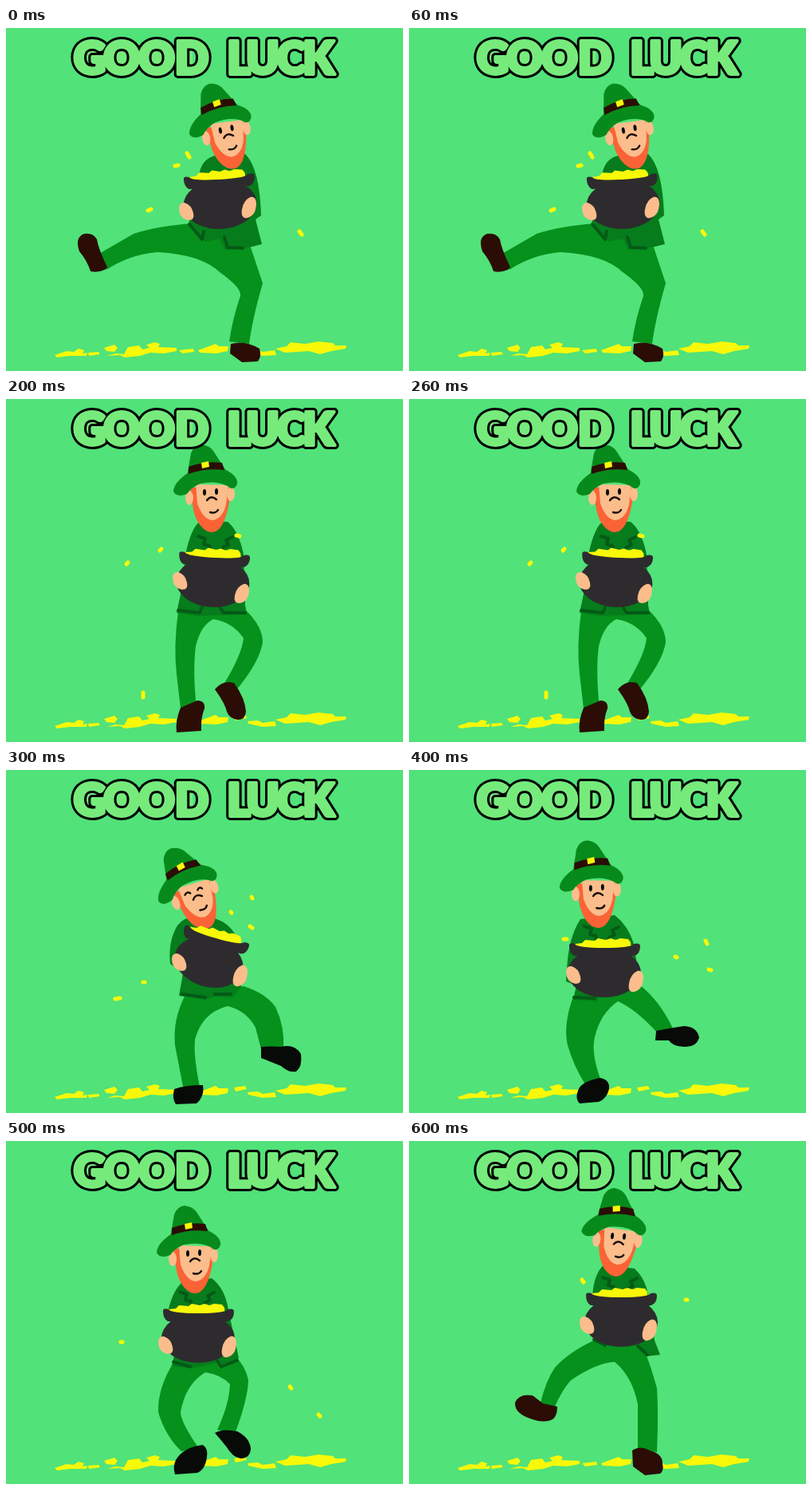
Write an HTML page without scripts that moves like this. It is 498 px wide and 430 px high and loops after 700 ms.

```html
<!DOCTYPE html>
<html lang="en">
<head>
<meta charset="utf-8">
<title>Good Luck</title>
<style>
html, body { margin: 0; width: 100%; height: 100%; overflow: hidden; background: #51e279; }
svg { display: block; width: 100vw; height: 100vh; }

.pose { visibility: hidden; animation: show 700ms step-end infinite; animation-delay: calc(var(--i) * 100ms - 700ms); }
@keyframes show {
  0% { visibility: visible; }
  14.2857%, 100% { visibility: hidden; }
}

.pants { fill: #05911c; }
.coat { fill: #067c1c; }
.hat { fill: #078a1c; }
.brown { fill: #2b0d06; }
.black { fill: #080a08; }
.iron { fill: #2e2b2e; }
.skin { fill: #fbbd8c; }
.beard { fill: #fb6336; }
.gold { fill: #f8f808; }
.trim, .line, .coins { fill: none; stroke-linecap: round; stroke-linejoin: round; }
.trim { stroke: #045a16; stroke-width: 4; }
.line { stroke: #1a0c08; stroke-width: 2.4; }
.coins { stroke: #f8f808; stroke-width: 5; }

.title { font: 900 56px Lato, Inter, sans-serif; text-anchor: middle; stroke-linejoin: round; fill: #76eb7c; }
.edge { fill: #000; stroke: #000; stroke-width: 10; }
.face { stroke: #76eb7c; stroke-width: 4; }
</style>
</head>
<body>
<svg viewBox="0 0 498 430" preserveAspectRatio="none">
<defs>
  <!-- origin at the nose -->
  <g id="head">
    <path class="beard" d="M-27-14L-23 14Q-18 35-5 41Q4 44 10 37Q18 28 22 4L24-14Z"/>
    <ellipse class="skin" cx="-28" cy="-1" rx="5" ry="9"/>
    <ellipse class="skin" cx="24" cy="-6" rx="5" ry="9"/>
    <path class="skin" d="M-20-18L-18 6Q-11 26 1 27Q14 25 18 7L21-17Z"/>
    <path class="hat" d="M-31-28L-26-57Q-22-67-13-68Q-3-67 2-60L20-32Z"/>
    <path class="hat" d="M-48-9Q-48-20-29-33Q-6-40 16-37Q33-29 32-19Q30-12 24-13Q10-24-14-19Q-26-14-31-6Q-44-1-48-9Z"/>
    <path class="brown" d="M-29-40Q-8-48 13-45L16-36Q-8-39-29-31Z"/>
    <path class="gold" d="M-13-45L-4-47L-3-40L-12-38Z"/>
    <path class="line" d="M-6 2Q-1-5 6 1M-2 17Q5 19 8 14"/>
  </g>
  <g id="eyes">
    <ellipse class="black" cx="-9" cy="-8" rx="2" ry="4"/>
    <ellipse class="black" cx="6" cy="-9" rx="2" ry="4"/>
  </g>
  <path id="shut" class="line" d="M-14-7Q-10-11-7-7M3-8Q6-12 9-8"/>
  <!-- origin at the middle of the rim -->
  <g id="pot">
    <path class="gold" d="M-36 4L-37-6L-28-7L-24-11L-12-10L-8-13L2-11L8-13L14-11L20-13L30-12L33-8L34 4Z"/>
    <ellipse class="iron" cy="30" rx="46" ry="31"/>
    <path class="iron" d="M-44-4Q-44-8-37-6Q-34-1 0-1T37-6Q45-8 45-3Q45 6 38 9H-38Q-44 6-44-4Z"/>
  </g>
  <path id="lapel" class="trim" d="M-24-25l9 3-2 7 7 2 2 8M19-24l-8 4 3 6-7 3-1 7"/>
  <path id="hand" class="skin" d="M-9-5Q-8-12-2-11Q7-8 9 2Q11 11 3 11Q-9 9-9-5Z"/>
</defs>

<g class="gold">
  <path d="M61 410L76 405L85 406L91 402L98 404L96 408L102 407L101 411L80 411L64 413Z"/>
  <path d="M103 407L116 406L118 409L104 411Z"/>
  <path d="M123 401L136 397L140 401L136 406L126 405Z"/>
  <path d="M127 411L137 408L148 409L153 400L167 398L171 403L180 401L176 397L187 394L193 396L191 400L214 401L214 405L198 408L181 407L168 411L149 413L143 410Z"/>
  <path d="M217 404L235 402L236 406L221 408Z"/>
  <path d="M241 404L252 400L263 396L267 399L279 399L278 405L264 408L243 407Z"/>
  <path d="M286 398L300 396L302 400L288 403Z"/>
  <path d="M303 404L316 403L322 406L337 404L339 410L322 411L304 407Z"/>
  <path d="M338 402L352 399L357 394L375 396L392 393L410 395L413 398L427 398L426 402L408 405L394 409L380 405L366 406L350 407Z"/>
</g>

<g class="pose" style="--i:0">
  <path class="pants" d="M235 245Q190 248 160 258L115 284L126 303Q155 284 190 281Q245 284 268 306Q296 326 294 336Q284 365 280 393L305 396Q309 365 322 320Q314 296 306 272L270 255Z"/>
  <path class="coat" d="M243 180Q247 164 262 160L300 158Q318 175 320 235L313 240L321 271Q300 277 275 278L268 264L250 268L229 246Z"/>
  <path class="trim" d="M230 246L246 265L248 255M274 262L278 275L297 276"/>
  <path class="brown" d="M124 303Q115 307 106 305Q102 292 92 280Q86 262 98 258Q109 256 114 265Q116 277 127 300ZM282 396Q300 391 318 402Q321 411 316 418L296 419L281 408Z"/>
  <use href="#head" transform="translate(279 135) rotate(-9)"/>
  <use href="#eyes" transform="translate(279 135) rotate(-9)"/>
  <use href="#pot" transform="translate(267 191) rotate(-3)"/>
  <use href="#hand" x="226" y="230"/>
  <use href="#hand" transform="translate(305 225) scale(-1 1.2)"/>
  <path class="coins" d="M227 157l3 5M212 173l4-1M178 229l4-2M368 255l3 4"/>
</g>

<g class="pose" style="--i:1">
  <path class="pants" d="M226 246Q190 262 163 282Q155 288 159 296Q170 320 170 350L189 350Q188 320 183 300Q215 278 245 277Q280 288 296 318Q284 350 278 392L299 394Q304 360 320 320Q316 300 289 266Z"/>
  <path class="coat" d="M230 172Q232 152 248 147L284 150Q304 165 310 222L304 230L305 268Q285 273 270 270L228 252L224 260Q210 252 199 235L212 226Z"/>
  <path class="trim" d="M201 237L224 258L228 247M268 258L274 269L286 269"/>
  <path class="black" d="M141 346Q144 337 160 337L172 347L190 349Q192 362 189 371Q180 375 170 366Q145 356 141 346ZM280 396Q300 391 318 402Q320 410 316 416L298 419L281 406Z"/>
  <use href="#lapel" x="266" y="186"/>
  <use href="#head" transform="translate(265 126)"/>
  <use href="#eyes" transform="translate(265 126)"/>
  <use href="#pot" transform="translate(260 188) rotate(5)"/>
  <use href="#hand" x="217" y="217"/>
  <use href="#hand" transform="translate(294 234) scale(-1 1.2)"/>
  <path class="coins" d="M167 156l4 1M196 174l4-1M126 272l3 3M368 329l2 5M290 171l3-1"/>
</g>

<g class="pose" style="--i:2">
  <path class="pants" d="M216 266Q210 310 214 345L219 388L239 388Q234 340 238 310Q244 284 260 276Q285 280 298 300Q296 320 273 358L288 366Q318 330 322 305Q322 285 300 264Z"/>
  <path class="coat" d="M225 196Q232 160 245 152L278 154Q292 165 298 195L300 258L302 270L240 272L214 268L220 240Z"/>
  <path class="trim" d="M216 265L243 268L246 261M269 262L273 268L300 268"/>
  <path class="brown" d="M219 387L240 378Q250 378 249 388Q244 400 245 416L214 418Q212 404 219 387ZM262 364Q272 352 286 356Q300 375 301 392Q300 403 290 402Q280 400 277 392Q275 382 262 364Z"/>
  <use href="#lapel" x="265" y="197"/>
  <use href="#head" transform="translate(258 125)"/>
  <use href="#eyes" transform="translate(258 125)"/>
  <use href="#pot" transform="translate(261 200) rotate(3)"/>
  <use href="#hand" x="218" y="228"/>
  <use href="#hand" transform="translate(296 244) scale(-1 1.1)"/>
  <path class="coins" d="M151 207l2-2M193 190l2-2M172 368v6M289 171l4 1"/>
</g>

<g class="pose" style="--i:3">
  <path class="pants" d="M225 282Q209 312 212 345L222 397L243 397Q235 358 237 338Q246 304 278 296Q302 302 313 323L320 350L348 350Q350 322 338 297Q326 280 298 271Z"/>
  <path class="coat" d="M206 243Q203 215 215 195Q225 182 240 185L262 186Q280 192 288 207L295 272L284 285L262 284L250 288L217 283L222 255Z"/>
  <path class="trim" d="M221 281L250 285M262 281L282 281"/>
  <path class="black" d="M211 400Q225 395 247 395Q249 405 243 414L239 418L213 419Q208 412 211 400ZM320 347Q332 346 345 347Q362 343 370 356Q372 372 364 378Q355 380 345 371L320 361Z"/>
  <use href="#head" transform="translate(240 159) rotate(-18)"/>
  <use href="#shut" transform="translate(240 159) rotate(-18)"/>
  <use href="#pot" transform="translate(263 212) rotate(16) scale(.95 1)"/>
  <use href="#hand" x="217" y="241"/>
  <use href="#hand" transform="translate(294 258) scale(-1 1.2)"/>
  <path class="coins" d="M308 159l1 2M282 178l1 1M306 196l3 2M172 266l2 0M137 287l6-1"/>
</g>

<g class="pose" style="--i:4">
  <path class="pants" d="M206 284Q193 320 199 345Q206 370 221 394L241 390Q228 355 233 335Q240 305 262 290Q285 300 312 330L331 324Q315 290 290 270Z"/>
  <path class="coat" d="M198 250Q200 210 215 187L258 182Q275 195 282 218L290 270L238 283L236 290L206 288L210 270L197 265Z"/>
  <path class="trim" d="M207 285L233 286"/>
  <path class="black" d="M212 402Q216 390 240 386Q252 388 251 400Q248 412 238 416L214 418Q208 412 212 402ZM310 327Q325 324 345 321Q362 322 364 336Q360 348 345 347Q330 346 326 339L309 339Z"/>
  <use href="#lapel" x="244" y="221"/>
  <use href="#head" transform="translate(237 156) rotate(-1)"/>
  <use href="#eyes" transform="translate(237 156) rotate(-1)"/>
  <use href="#pot" transform="translate(245 224)"/>
  <use href="#hand" x="206" y="257"/>
  <use href="#hand" transform="translate(285 265) scale(-1 1.2)"/>
  <path class="coins" d="M194 212l4 0M334 234l2 1M372 214l2 4M376 250l3 1"/>
</g>

<g class="pose" style="--i:5">
  <path class="pants" d="M210 278Q190 310 191 340Q200 370 220 389L241 384Q219 352 219 340Q225 305 250 290Q270 293 281 305Q280 330 265 362L287 367Q303 325 304 300Q300 280 285 268Z"/>
  <path class="coat" d="M203 215Q208 190 220 178L258 172Q275 185 279 212L292 272Q280 285 265 278L232 285L208 282L213 260Z"/>
  <path class="trim" d="M210 277L231 283M264 274L270 283L290 275"/>
  <path class="black" d="M213 400Q222 384 247 381Q254 386 252 396Q250 412 240 416L212 418Q209 408 213 400ZM262 366Q272 360 290 364Q306 372 307 386Q306 398 294 398Q284 396 277 384Q270 375 262 366Z"/>
  <use href="#lapel" x="242" y="214"/>
  <use href="#head" transform="translate(237 149)"/>
  <use href="#eyes" transform="translate(237 149)"/>
  <use href="#pot" transform="translate(241 217)"/>
  <use href="#hand" x="200" y="256"/>
  <use href="#hand" transform="translate(280 258) scale(-1 1.2)"/>
  <path class="coins" d="M144 252l2 0M356 308l2 2M392 343l2 2"/>
</g>

<g class="pose" style="--i:6">
  <path class="pants" d="M232 250Q200 265 183 284Q172 300 165 328L182 335Q192 312 203 300Q235 278 258 277Q280 295 287 330L287 387L311 390Q313 340 311 310Q303 280 292 254Z"/>
  <path class="coat" d="M230 195Q232 165 245 155L283 160Q296 172 300 192L308 250L315 268L297 270L285 256L245 256L232 240Z"/>
  <path class="trim" d="M232 249L246 256M287 257L299 268"/>
  <path class="brown" d="M133 328Q138 316 155 319L168 329L186 333Q186 345 180 349Q170 354 155 349Q132 342 133 328ZM280 388Q290 381 302 388Q318 392 318 404Q320 414 315 417L296 419L281 408Z"/>
  <use href="#lapel" x="267" y="196"/>
  <use href="#head" transform="translate(263 128) rotate(7)"/>
  <use href="#eyes" transform="translate(263 128) rotate(7)"/>
  <use href="#pot" transform="translate(266 197)"/>
  <use href="#hand" x="223" y="231"/>
  <use href="#hand" transform="translate(302 237) scale(-1 1.2)"/>
  <path class="coins" d="M217 174l2 3M347 199h2"/>
</g>

<g class="title">
  <!-- fills the holes of the round letters -->
  <path d="M94 28h140v20h-140z"/>
  <g class="edge" aria-hidden="true">
    <text y="58" x="105 145 189 233">GOOD</text>
    <text y="58" x="292 322 358 392">LUCK</text>
  </g>
  <g class="face">
    <text y="58" x="105 145 189 233">GOOD</text>
    <text y="58" x="292 322 358 392">LUCK</text>
  </g>
</g>
</svg>
</body>
</html>
```
